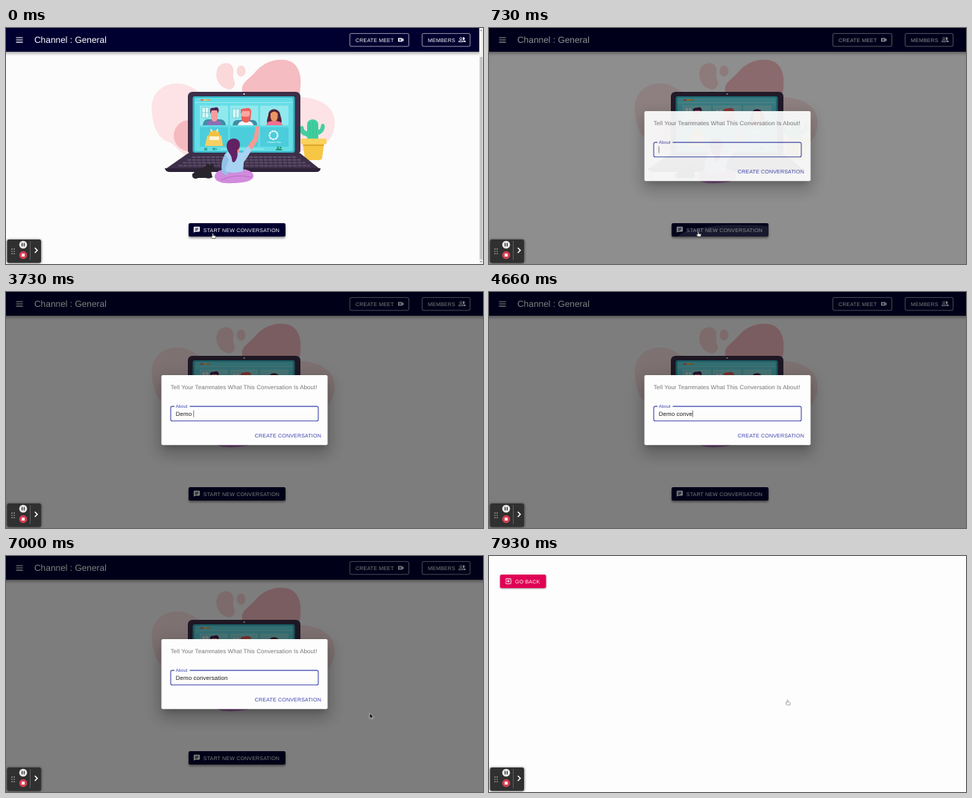
Write an HTML page that moves like this. It is 640x318 px and loops after 8000 ms.

```html
<!DOCTYPE html>
<html lang="en">
<head>
<meta charset="utf-8">
<title>Start a conversation</title>
<style>
  html, body { margin: 0; width: 100%; height: 100%; overflow: hidden; background: #fcfcfc; }
  svg { display: block; width: 640px; height: 318px; }
  text { font-family: "Liberation Sans", Arial, sans-serif; white-space: pre; text-rendering: geometricPrecision; }
  .btn { font-size: 7px; letter-spacing: .2px; }
  .body { font-size: 7.95px; letter-spacing: .075px; }
</style>
</head>
<body>
<svg viewBox="0 0 640 318" xmlns="http://www.w3.org/2000/svg">
  <defs>
    <clipPath id="btnClip"><rect x="245" y="263" width="130" height="18" rx="2"/></clipPath>
    <g id="hand">
      <path d="M-.7 .7Q0-.4 .7 .7V3L3.3 3.6Q4.2 3.9 4 5L3.4 7H-.9L-2.4 4.6Q-2.4 3.5-.7 4.3Z" fill="#fff" stroke="#333" stroke-width=".7" stroke-linejoin="round"/>
    </g>
    <path id="arrow" d="M0 0V7.4L1.8 5.8L3 8.4L4.1 7.9L3 5.4H5.3Z" fill="#111" stroke="#fff" stroke-width=".5"/>
  </defs>

  <g id="room">
    <rect width="640" height="318" fill="#fcfcfc"/>

    <g id="art">
      <path d="M196 116C192 88 211 73 234 75C254 77 260 94 285 92L370 96C397 88 440 95 441 126C442 155 418 168 390 166L260 172C238 181 231 158 217 153C203 148 198 132 196 116Z" fill="#fde3e5"/>
      <path d="M318 88C313 75 324 71 333 61C343 48 358 41 374 43C391 45 399 61 394 88Z" fill="#f5bcc1"/>
      <path d="M283 57C285 46 300 44 304 52C307 59 303 63 306 70C310 78 303 85 296 82C286 79 280 68 283 57Z" fill="#fbd8da"/>
      <ellipse cx="315.5" cy="58" rx="6" ry="7.5" fill="#fbd8da"/>
      <circle cx="246" cy="145" r="21" fill="#f5bac0"/>

      <path d="M406 152C403 147 405 146 400 145C393 143 393 132 397 132C401 132 398 139 404 139V130C404 121 419 121 419 130V137C424 137 421 129 425 129C430 129 428 142 419 144V152Z" fill="#42cfa0"/>
      <path d="M408 128V148M412 126V148M416 129V148" stroke="#2eb88b" stroke-width=".6"/>
      <path d="M398 154H427L424 176Q423 178 420 178H405Q402 178 401 176Z" fill="#f6c644"/>
      <rect x="395.500" y="149" width="34.500" height="7.500" rx="1.500" fill="#fad25c"/>
      <path d="M398.500 157H426.500L426.200 159H399Z" fill="#dfa92f"/>

      <path d="M244 169H395L421 190H214Z" fill="#3d2f49"/>
      <g id="keys" stroke="#604f6c" stroke-width="2" stroke-dasharray="5 1.4"/>
      <path d="M213 189H422Q422 194 416 194H220Q214 194 213 189Z" fill="#2d2238"/>
      <rect x="244" y="86" width="151" height="85" rx="6" fill="#3d2f49"/>
      <rect x="250.500" y="92" width="137" height="76" rx="3" fill="#36b8c7"/>
      <rect x="253" y="94" width="132" height="72" rx="2" fill="#64dde6"/>
      <path d="M253 100.500H385" stroke="#a2f0f2" stroke-width=".8"/>
      <circle cx="319.500" cy="89" r="1" fill="#fff"/>
      <path d="M261 97H265" stroke="#f06b65" stroke-width="2"/>
      <path d="M265.500 97H269.500" stroke="#f6c644" stroke-width="2"/>
      <path d="M270 97H274" stroke="#f39a52" stroke-width="2"/>
      <g id="tiles"/>

      <path d="M263 107H272V121H263ZM267.500 107V121M263 114H272M304 109H313V121H304ZM308.500 109V121" fill="#d9f8f8" stroke="#58c3d1" stroke-width=".7"/>
      <path d="M264 131Q265 122 272 123H287Q294 123 295 131Z" fill="#3d8fa6"/>
      <path d="M269 131Q270 124 279 123Q289 124 290 131Z" fill="#8a6fb3"/>
      <path d="M275 111H284V121Q283 126 279.500 126Q276 126 275 121Z" fill="#f79c9c"/>
      <path d="M274 116V111Q273 107 279 107.500Q285 105 285.500 111L284.500 115L283 111H276Z" fill="#532253"/>
      <path d="M304 131Q305 123 312 124H331Q337 124 337 131Z" fill="#3d8fa6"/>
      <path d="M311 131Q312 125 321 125Q331 125 332 131Z" fill="#f5f5fa"/>
      <path d="M316 112H327V121H316Z" fill="#f9a7a0"/>
      <path d="M315 117V112Q314 108 320 108.500Q328 106 329 112L328 124Q322 131 316 124L315.500 118L318 119.500H325.500L327 117V112H317Z" fill="#ee5f5b"/>
      <path d="M353 129C348 129 351 121 352 117C352 107 367 107 368 117C369 122 372 128 367 129Z" fill="#522238"/>
      <path d="M349 131Q350 125 359.500 125Q370 125 371 131Z" fill="#f06f91"/>
      <path d="M355 115Q360 110 364.500 115V121Q363 126 360 126Q356 126 355 121Z" fill="#e99662"/>
      <path d="M267 159L270 145H289L291 159Z" fill="#f6cf63"/>
      <path d="M272 148Q271 138 279.500 138Q288 138 287 148Z" fill="#f3c042"/>
      <path d="M273 146H286V151H273Z" fill="#fff3d2"/>
      <path d="M276 140L275 136M283 140L284 136" stroke="#f7eab8" stroke-width="2"/>
      <circle cx="359" cy="144.500" r="5.500" fill="none" stroke="#fff" stroke-width="2" stroke-dasharray="3 .7"/>
      <text x="359.500" y="154.500" font-size="2.900" text-anchor="middle" fill="#fff">CONNECTING</text>
      <path d="M266 161.500H270V165H266ZM277 161.500H281V164.500H277ZM281 163L283 161.500V164.500Z" fill="#2aa99b"/>
      <path d="M288 163H346" stroke="#a6f0f0" stroke-width="1"/>
      <path d="M362 165Q362 162 365 162Q367 162 367 163Q369 161 371 165Z" fill="#249a79"/>
      <circle cx="365" cy="160.800" r="1.300" fill="#249a79"/><circle cx="368.500" cy="161" r="1.200" fill="#249a79"/>

      <path d="M252 202C248 196 255 191 260 190C267 188 267 186 269 185L270 182L272.500 184.500L275.500 184.500L278 182L279 187Q279 191 275 193L277 201Q273 204 268 202Z" fill="#28242c"/>
      <path d="M258 201Q250 204 251 197" fill="none" stroke="#28242c" stroke-width="2" stroke-linecap="round"/>

      <path d="M280 201C280 191 293 190 302 190C318 188 333 192 332 200C331 207 316 209 304 209C290 210 281 207 280 201Z" fill="#d18bdd"/>
      <path d="M288 205Q308 196 329 201" fill="none" stroke="#b96bc9" stroke-width="1"/>
      <path d="M314 173L332 149L335 134Q338 129 340 134L338 151L321 178Z" fill="#f79a93"/>
      <path d="M293 171Q298 164 307 166L317 168L325 159L330 164L319 181L318 193Q306 197 292 193Z" fill="#a8d3f3"/>
      <path d="M294 170Q287 180 290 195L297 199L298 195L294 191L299 177Z" fill="#93c1e8"/>
      <path d="M308 160H313V168H306Z" fill="#f79a93"/>
      <path d="M296 159C296 150 304 147 310 150C316 153 314 163 311 164C309 165 313 171 308 179Q304 184 303 177C303 170 296 167 296 159Z" fill="#612162"/>
    </g>

    <rect id="barShadow" x="-10" y="4" width="660" height="30" fill="#000" opacity=".38" style="filter:blur(2px)"/>
    <rect id="bar" width="640" height="32" fill="#000030"/>
    <path d="M13.500 12.900H22.600M13.500 16H22.600M13.500 19.100H22.600" stroke="#fff" stroke-width="1.050"/>
    <text x="38" y="20.200" font-size="11.950" fill="#fff">Channel : General</text>
    <g fill="none" stroke="#fff" stroke-opacity=".72" stroke-width=".8">
      <rect x="461.300" y="7.400" width="79.200" height="17.400" rx="2"/>
      <rect x="558.300" y="7.400" width="64.400" height="17.400" rx="2"/>
    </g>
    <g fill="#fff">
      <text class="btn" x="469" y="18.500">CREATE MEET</text>
      <text class="btn" x="566" y="18.500">MEMBERS</text>
      <path transform="translate(524.800 11.100) scale(.41)" fill-rule="evenodd" d="M17 10.500V7Q17 6 16 6H4Q3 6 3 7V17Q3 18 4 18H16Q17 18 17 17V13.500L21 17.500V6.500ZM14 13H11V16H9V13H6V11H9V8H11V11H14Z"/>
      <circle cx="610.300" cy="14.300" r="1.500" fill="none" stroke="#fff" stroke-width=".8"/>
      <path d="M607.400 18.700V17.700Q610.300 15.600 613.200 17.700V18.700Z" fill="none" stroke="#fff" stroke-width=".8"/>
      <path d="M613 12.500A1.900 1.900 0 1 1 613 16ZM613.500 16.600Q616.800 16.700 616.800 18.200V19.100H614.200V17.900Z"/>
    </g>

    <rect x="245" y="265" width="130" height="18" rx="2" fill="#000" opacity=".45" style="filter:blur(1.800px)"/>
    <rect x="245" y="263" width="130" height="18" rx="2" fill="#000030"/>
    <g clip-path="url(#btnClip)"><ellipse id="ripple" cx="337" cy="283" fill="#fff"/></g>
    <path transform="translate(251 267) scale(.41)" fill="#fff" fill-rule="evenodd" d="M20 2H4Q2 2 2 4V22L6 18H20Q22 18 22 16V4Q22 2 20 2ZM6 9H18V11H6ZM14 14H6V12H14ZM18 8H6V6H18Z"/>
    <text class="btn" x="264.800" y="274.500" fill="#fff">START NEW CONVERSATION</text>

    <g id="scroll">
      <rect x="635" width="5" height="318" fill="#f1f1f1"/>
      <rect x="635.600" y="39" width="3.800" height="273" fill="#c4c4c4"/>
      <path d="M636.200 4L637.500 2L638.800 4ZM636.200 314L637.500 316L638.800 314Z" fill="#777"/>
    </g>
    <rect id="shade" width="640" height="318"/>
  </g>

  <g id="dialog">
    <g id="dialogShadow"/>
    <rect x="208.500" y="112" width="223" height="94.300" rx="2" fill="#fdfdfd"/>
    <text class="body" x="220.800" y="130.800" fill="#767676">Tell Your Teammates What This Conversation Is About!</text>
    <path id="field" d="M226 154.100H223Q221 154.100 221 156.100V171.700Q221 173.700 223 173.700H417Q419 173.700 419 171.700V156.100Q419 154.100 417 154.100H246.500" fill="none"/>
    <text id="label" x="227.800" y="156.300" font-size="5.950" letter-spacing=".05">About</text>
    <text id="typed" class="body" xml:space="preserve" x="227.800" y="166.700" fill="#1c1c1c"></text>
    <path id="caret" d="M0 159.500V168.500" stroke="#222" stroke-width=".6"/>
    <rect id="hover" x="330" y="184" width="97" height="18" rx="2" fill="#3f51b5"/>
    <text class="btn" x="333.800" y="195.600" fill="#3d3fae">CREATE CONVERSATION</text>
  </g>

  <g id="next">
    <rect width="640" height="318" fill="#fdfdfd"/>
    <rect x="15" y="26.500" width="61.500" height="17.500" rx="2" fill="#000" opacity=".4" style="filter:blur(1.200px)"/>
    <rect x="14.800" y="25" width="61.700" height="18.300" rx="2" fill="#e00055"/>
    <path transform="translate(21.100 29.100) scale(.41)" fill="#fff" d="M10 15.600L11.500 17L16.500 12L11.500 7L10 8.400L12.700 11H3V13H12.700ZM19 3H5Q3 3 3 5V9H5V5H19V19H5V15H3V19Q3 21 5 21H19Q21 21 21 19V5Q21 3 19 3Z"/>
    <text class="btn" x="35" y="36.600" fill="#fff">GO BACK</text>
  </g>

  <use id="pointer" href="#hand"/>

  <g id="recorder">
    <rect x="1" y="285" width="46.500" height="32" rx="3" fill="#000" opacity=".55" style="filter:blur(1.500px)"/>
    <rect x="1.500" y="285" width="45.500" height="31.500" rx="2.500" fill="#303030"/>
    <path d="M8 297.200V305M11 297.200V305" stroke="#ddd" stroke-width="1.200" stroke-dasharray="1.200 2"/>
    <circle cx="23" cy="292" r="5.300" fill="#e8e8e8"/>
    <path d="M21.600 289.800V294.200M24.400 289.800V294.200" stroke="#303030" stroke-width="1.300"/>
    <circle cx="23" cy="306" r="5.300" fill="#d53e50"/>
    <rect x="21" y="304" width="4" height="4" rx=".5" fill="#fff"/>
    <path d="M32.500 287V313" stroke="#686868" stroke-width=".8"/>
    <path d="M38.700 296.200L42 299.600L38.700 303" fill="none" stroke="#fff" stroke-width="1.500"/>
  </g>
</svg>
<script>
const LOOP = 8000, OPEN = 660, BLUR = 7660, LEAVE = 7930;
const MESSAGE = "Demo conversation";
const KEYS = [2660, 2930, 3200, 3400, 3730, 4000, 4200, 4330, 4460, 4660, 4860, 4930, 5200, 5330, 5800, 5930, 6130];
// time, x, y of the pointer tip
const PATH = [[60, 277.500, 276.500], [500, 280.700, 274], [6600, 280.700, 274], [6930, 488, 214], [7060, 488, 210], [7400, 400.500, 193.800]];

const $ = id => document.getElementById(id);
const clamp = v => Math.min(1, Math.max(0, v));
const ease = v => v * v * (3 - 2 * v);
const show = (id, on) => set(id, { display: on ? "inline" : "none" });

function set(el, attrs) {
  if (typeof el === "string") el = $(el);
  for (const k in attrs) el.setAttribute(k, attrs[k]);
  return el;
}

function add(parent, tag, attrs) {
  const el = document.createElementNS("http://www.w3.org/2000/svg", tag);
  return $(parent).appendChild(set(el, attrs));
}

function build() {
  for (let i = 0; i < 4; i++) {
    const y = 174 + i * 3.8, half = 70 + i * 6;
    add("keys", "path", { d: `M${319.5 - half} ${y}H${319.5 + half}` });
  }
  for (let i = 0; i < 6; i++) {
    add("tiles", "rect", {
      x: 260 + (i % 3) * 40.5, y: i < 3 ? 104.5 : 133.5, width: 38, height: 26.5, rx: 1,
      fill: i < 3 ? "#91e9ee" : "#4ccddb"
    });
  }
  for (const [dy, sd, grow, opacity] of [[5.4, 3.7, -3.4, .2], [11.8, 9.4, 1.5, .14], [4.4, 11.3, 4, .12]]) {
    add("dialogShadow", "rect", {
      x: 208.5 - grow, y: 112 + dy - grow, width: 223 + 2 * grow, height: 94.3 + 2 * grow,
      opacity, style: `filter:blur(${sd}px)`
    });
  }
}

function pointerAt(t) {
  let a = PATH[0];
  for (const b of PATH) {
    if (t < b[0]) {
      const k = ease(clamp((t - a[0]) / (b[0] - a[0])));
      return [a[1] + (b[1] - a[1]) * k, a[2] + (b[2] - a[2]) * k];
    }
    a = b;
  }
  return [a[1], a[2]];
}

function drawPointer(t) {
  const [x, y] = pointerAt(t);
  const onStart = t < 6600;
  const onCreate = x > 330 && x < 427 && y > 184 && y < 202;
  show("pointer", t < KEYS[0] || t >= 6600);
  set("pointer", {
    href: onStart || onCreate ? "#hand" : "#arrow",
    transform: `translate(${x} ${y})`,
    opacity: t >= LEAVE ? .6 : 1
  });
}

function drawField(t) {
  const focus = t < BLUR;
  const count = KEYS.filter(k => k <= t).length;
  const typed = $("typed");
  const value = MESSAGE.slice(0, count);
  if (typed.textContent !== value) typed.textContent = value;
  set("field", { stroke: focus ? "#3f48ad" : "#c6c6c6", "stroke-width": focus ? 1.1 : .6 });
  set("label", { fill: focus ? "#3f48ad" : "#767676" });
  const since = t - (count ? KEYS[count - 1] : 800);
  show("caret", focus && since % 1200 < 600);
  set("caret", { transform: `translate(${228 + (count ? typed.getComputedTextLength() : 0)} 0)` });
}

function draw(t) {
  const open = t >= OPEN;
  const stage = t < OPEN ? 0 : t < 730 ? 1 : t < 800 ? 2 : 3;
  show("next", t >= LEAVE);
  show("scroll", !open);
  set("bar", { width: open ? 640 : 635 });
  set("shade", { opacity: [0, .032, .44, .5][stage] });
  set("dialog", { opacity: [0, .06, .93, 1][stage] });

  const spread = clamp((t - 600) / 250);
  set("ripple", {
    rx: 160 * spread, ry: 34 * spread,
    opacity: t < 600 ? 0 : .17 * (1 - clamp((t - 730) / 550))
  });
  set("hover", { opacity: .05 * clamp((t - 7300) / 250) });
  drawField(t);
  drawPointer(t);
}

function frame() {
  draw(performance.now() % LOOP);
  requestAnimationFrame(frame);
}

build();
frame();
</script>
</body>
</html>
```
